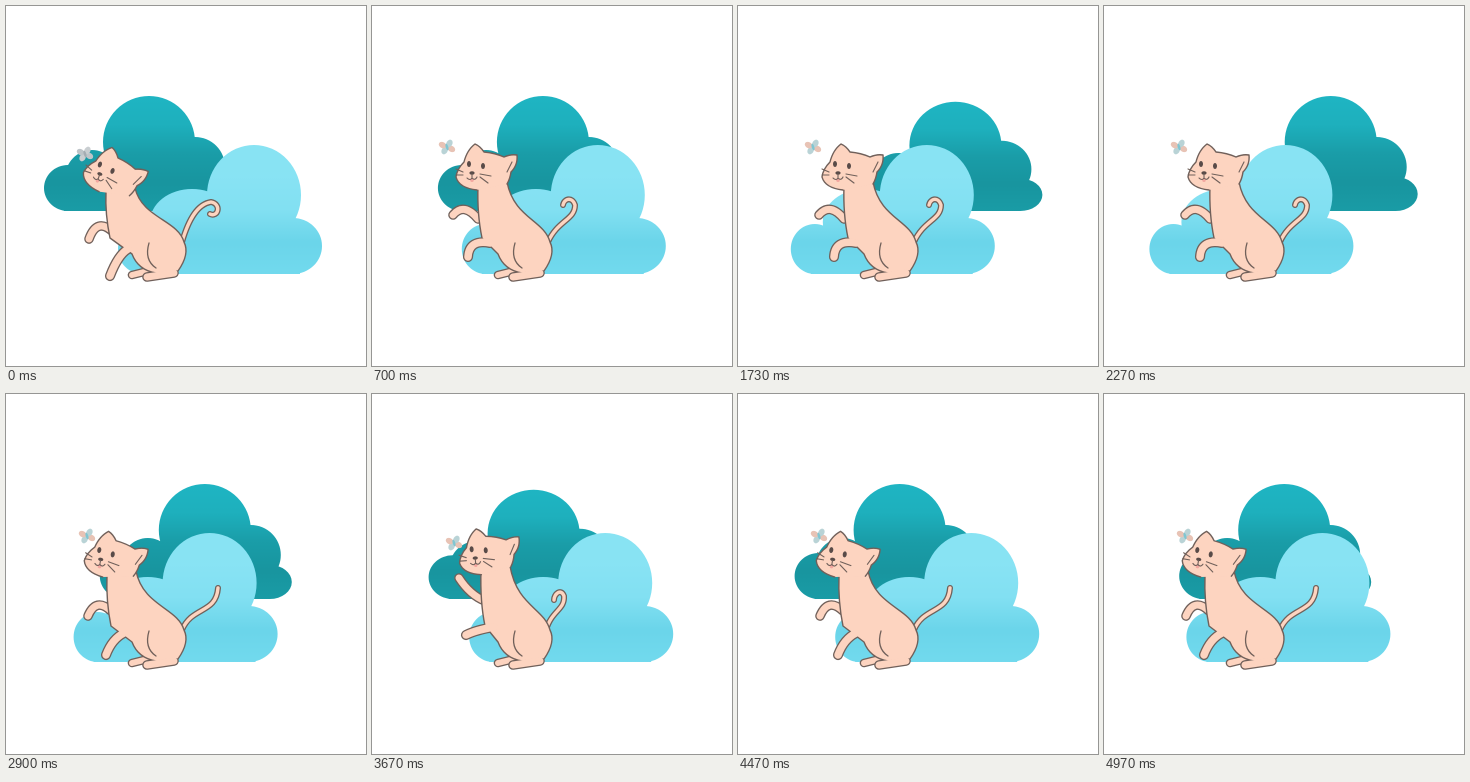
An HTML page with a canvas for the animation above (5 s loop, 360x360 px).

```html
<!DOCTYPE html>
<html lang="en">
<head>
<meta charset="utf-8">
<title>Cat and clouds</title>
<style>
html, body { margin: 0; width: 100%; height: 100%; overflow: hidden; background: #fff; }
canvas { display: block; width: 100vmin; height: 100vmin; }
</style>
</head>
<body>
<canvas id="stage"></canvas>
<script>
const LOOP = 5000, CAT_LOOP = 2600, POSE_TIME = 130, CLOUD_STEP = 200;
const SKIN = '#fdd4c0', LINE = '#70605a', DARK = '#594b48';

const canvas = document.getElementById('stage');
const ctx = canvas.getContext('2d');
const ratio = Math.max(2, window.devicePixelRatio || 1);
canvas.width = canvas.height = 360 * ratio;

// A cloud is a union of round lobes [x, y, rx, ry] on a flat base.
function makeCloud(lobes, top, base, width, colors) {
  const path = new Path2D();
  for (const [x, y, rx, ry] of lobes) {
    path.moveTo(x + rx, y);
    path.ellipse(x, y, rx, ry, 0, 0, 2 * Math.PI);
  }
  path.rect(20, base - 40, width - 42, 40);
  const fill = ctx.createLinearGradient(0, top, 0, base);
  colors.forEach((c, i) => fill.addColorStop(i / (colors.length - 1), c));
  return { path, fill, base };
}

const backCloud = makeCloud(
  [[24, 182, 24, 23], [48, 172, 27, 28], [105, 136, 46, 46], [151, 161, 30, 30], [170, 188, 22, 17]],
  90, 205, 192, ['#1fb5c3', '#1eb0bd', '#1a9da8', '#18959f', '#1a9ca6']);
const frontCloud = makeCloud(
  [[24, 243, 24, 25], [74, 216, 42, 33], [136, 189, 47, 50], [175, 240, 29, 28]],
  139, 268, 204, ['#88e3f3', '#88e3f4', '#82e0f2', '#6bd5ea', '#72daee']);

// head: centre and tilt; arms: shoulder, elbow, paw; in order crouch, swipe, stand, settle.
const POSES = [
  { head: [109, 170, 0.33], bug: [79, 148], far: 'M107 226Q91 211 83 233', near: 'M122 243Q112 249 104 270',
    tail: 'M176 236C183 212 192 198 205 196C216 198 212 212 204 208' },
  { head: [118, 160, -0.07], bug: [82, 149], far: 'M113 207Q98 201 87 184', near: 'M122 233Q104 236 94 241',
    tail: 'M174 236C180 216 193 216 192 202C189 194 182 200 182 206' },
  { head: [115, 164, 0], bug: [75, 141], far: 'M106 213Q92 196 81 209', near: 'M118 237Q97 233 96 251',
    tail: 'M176 236C186 214 203 214 203 199C200 190 192 193 191 199' },
  { head: [110, 165, 0.17], bug: [81, 142], far: 'M105 217Q90 203 82 222', near: 'M118 239Q106 245 100 261',
    tail: 'M176 236C186 212 210 220 212 194' }
];

const HEAD = new Path2D('M-10 20Q-28 18 -31 7Q-30 -1 -23 -8Q-20 -20 -12 -26Q-7 -24 -3 -18Q8 -17 17 -13Q24 -16 30 -15Q31 -5 24 2Q23 9 20 14');
const FACE = new Path2D('M-15 4v4m-5 0q3 3 5 0q3 3 5-1M-7 4l11 2m-11 1l8 6M-24 2l-7-3m7 6h-7M20 2l5-10');
const HIND_LEG = 'M168 267L141 271', FAR_FOOT = 'M142 265L126 269';
const HAUNCH = 'M143 237Q138 254 150 262';

function stroke(path, color, width) {
  ctx.strokeStyle = color;
  ctx.lineWidth = width;
  ctx.stroke(typeof path === 'string' ? new Path2D(path) : path);
}

const limbEdge = (path, width) => stroke(path, LINE, width + 2.6);
const limbSkin = (path, width) => stroke(path, SKIN, width);

function limb(path, width) {
  limbEdge(path, width);
  limbSkin(path, width);
}

function oval(x, y, rx, ry, color, turn = 0) {
  ctx.fillStyle = color;
  ctx.beginPath();
  ctx.ellipse(x, y, rx, ry, turn, 0, 2 * Math.PI);
  ctx.fill();
}

function drawCloud(cloud, x, height) {
  ctx.save();
  ctx.translate(x, cloud.base * (1 - height));
  ctx.scale(1, height);
  ctx.fillStyle = cloud.fill;
  ctx.fill(cloud.path);
  ctx.restore();
}

function drawBug([x, y], colors) {
  for (let i = 0; i < 4; i++) {
    const angle = 0.5 + i * Math.PI / 2;
    oval(x + 5 * Math.cos(angle), y + 4 * Math.sin(angle), 4, 3, colors[i % 2], angle);
  }
  oval(x, y, 1.3, 3.4, colors[2], -0.3);
}

function drawHead([x, y, tilt]) {
  ctx.save();
  ctx.translate(x, y);
  ctx.rotate(tilt);
  ctx.fillStyle = SKIN;
  ctx.fill(HEAD);
  stroke(HEAD, LINE, 1.4);
  oval(-18, -6, 2, 3, DARK);
  oval(-4, -4, 2, 3, DARK);
  oval(-15, 3, 2.6, 1.7, DARK);
  oval(-15, 10, 1.8, 2, '#f3a7a0');
  stroke(FACE, LINE, 1.1);
  ctx.restore();
}

function drawCat({ head, far, near, tail, bug }, bugColors) {
  const [x, y] = head;
  const body = new Path2D(`M${x - 9} ${y + 16}Q${x - 10} 208 ${x - 5} 232L126 248Q132 264 150 267
    L172 265Q184 248 178 236C172 214 ${x + 27} 212 ${x + 20} ${y + 12}`);
  drawBug(bug, bugColors);
  limb(tail, 3.4);
  limb(far, 7);
  limb(FAR_FOOT, 6);
  limbEdge(near, 7.5);
  limbEdge(HIND_LEG, 7);
  ctx.fillStyle = SKIN;
  ctx.fill(body);
  stroke(body, LINE, 1.4);
  limbSkin(near, 7.5);
  limbSkin(HIND_LEG, 7);
  stroke(HAUNCH, LINE, 1.3);
  drawHead(head);
}

function poseAt(t) {
  const slot = Math.floor((t % CAT_LOOP + 104) / POSE_TIME);
  return slot < 2 ? 0 : slot % POSES.length;
}

function draw() {
  const t = performance.now() % LOOP;
  const cloudTime = Math.floor(t / CLOUD_STEP) * CLOUD_STEP;
  const drift = Math.abs((cloudTime + 2000) % 4000 - 2000) / 2000;
  const low = cloudTime % 2000 >= 1200 && cloudTime % 2000 < 1900;
  const pose = poseAt(t);
  ctx.setTransform(ratio, 0, 0, ratio, 0, 0);
  ctx.fillStyle = '#fff';
  ctx.fillRect(0, 0, 360, 360);
  ctx.lineCap = ctx.lineJoin = 'round';
  drawCloud(backCloud, 38 + 93 * drift, low ? 0.95 : 1);
  drawCloud(frontCloud, 112 - 74 * drift, 1);
  drawCat(POSES[pose], pose ? ['#e8c3b5', '#b9d3d6', '#7fc6d2'] : ['#bec4c8', '#c9ced1', '#a4acb2']);
  requestAnimationFrame(draw);
}
draw();
</script>
</body>
</html>
```
